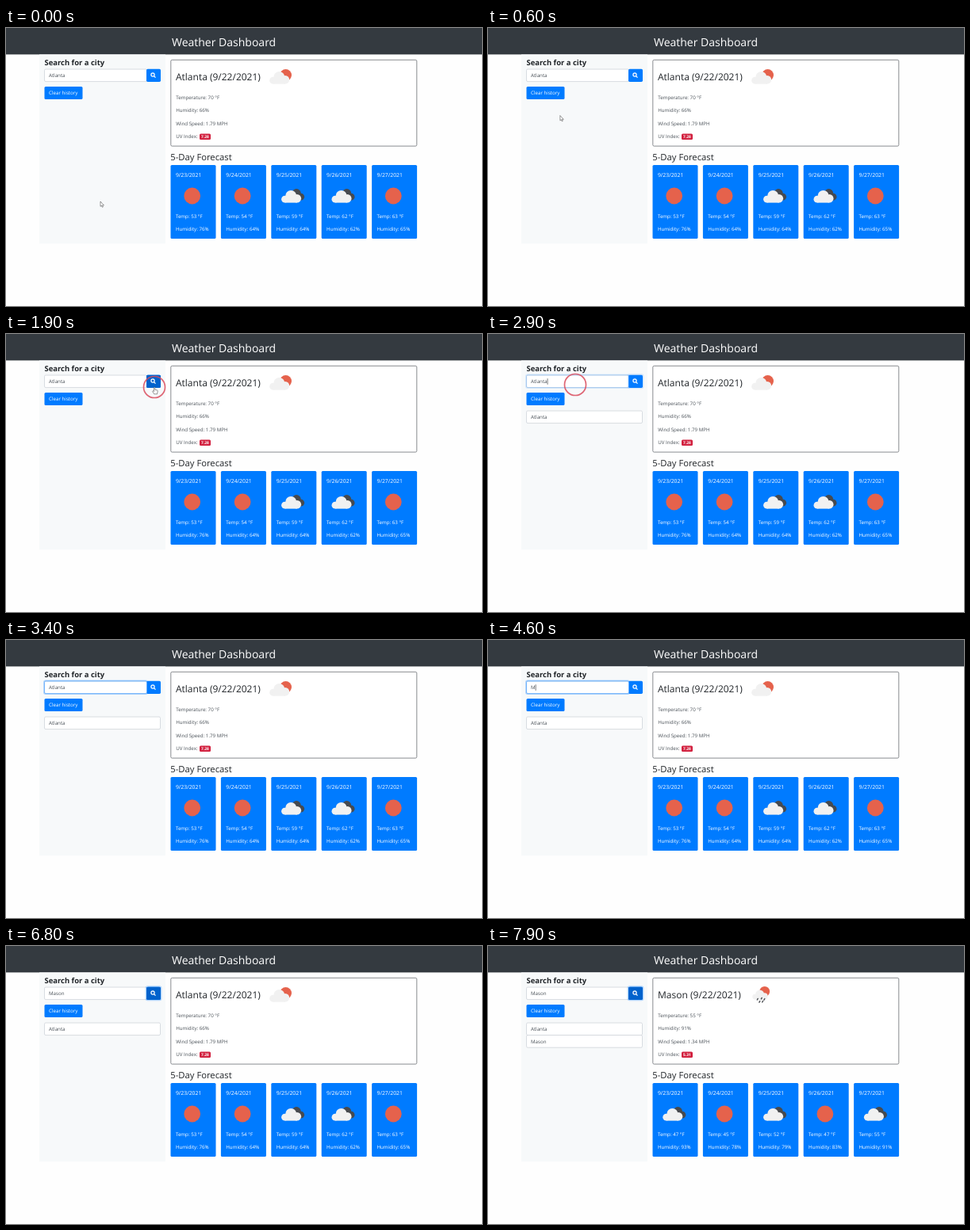
An HTML page for the animation above (8000 ms loop, 600 by 351 pixels).

```html
<!DOCTYPE html>
<html lang="en">
<head>
<meta charset="utf-8">
<title>Weather Dashboard</title>
<style>
html, body { margin: 0; width: 100%; height: 100%; overflow: hidden; background: #fefefe; }
svg { display: block; font: 6.2px "Open Sans", "Noto Sans", sans-serif; fill: #212529; text-rendering: geometricPrecision; }
.field { fill: #fff; stroke: #ced4da; stroke-width: .8; }
.gray { fill: #495057; }
.white { fill: #fff; }
.blue { fill: #007bff; }
.hover { fill: #0062cc; }
.glow { fill: none; stroke: #007bff; stroke-opacity: .28; stroke-width: 1.5; }
.sun { fill: #e5624c; }
.cloud { fill: #f1f1f1; }
.dark { fill: #474a4f; }
.arrow { fill: #fff; stroke: #333; stroke-width: .5; }
</style>
</head>
<body>
<svg id="stage" width="600" height="351" viewBox="0 0 600 351"></svg>
<script>
const LOOP = 8000;
const stage = document.getElementById('stage');
const clamp = v => Math.max(0, Math.min(1, v));
const fade = (t, from, to) => clamp((t - from) / 150) - clamp((t - to) / 150);

const text = (x, y, str, attrs = '') => `<text x="${x}" y="${y}" ${attrs}>${str}</text>`;
const rect = (x, y, w, h, attrs = '') => `<rect x="${x}" y="${y}" width="${w}" height="${h}" ${attrs}/>`;
const circle = (x, y, r, attrs = '') => `<circle cx="${x}" cy="${y}" r="${r}" ${attrs}/>`;
const group = (x, y, body, attrs = '') => `<g transform="translate(${x} ${y})" ${attrs}>${body}</g>`;

// Weather icons, drawn around their own centre
const cloud = `<g class="cloud">${circle(-10, 4.2, 4.4)}${circle(-2.3, 0, 7)}${circle(5.4, 3.3, 5.2)}${rect(-10, 2, 15.4, 6.6)}</g>`;
const drop = (x, y) => `<path d="M${x} ${y}l-.9 1.6" stroke="#474a4f" stroke-width="1.4" stroke-linecap="round"/>`;
const icons = {
  sun: circle(0, 0, 10.4, 'class="sun"'),
  clouds: `<g class="dark">${circle(4.6, -3.4, 5.6)}${circle(10.2, 1.2, 4.4)}${rect(3, 0, 7.5, 5.6)}</g>` + cloud,
  partly: circle(6, -2.5, 7.4, 'class="sun"') + cloud,
  rain: circle(4.3, -4.6, 6.4, 'class="sun"') +
    `<g transform="translate(0 -1.2) scale(.77)">${cloud}</g>` +
    drop(-4.2, 4.4) + drop(.8, 3.4) + drop(4.4, 4.6) + drop(-1.6, 7.6) + drop(2.2, 7.4)
};

function forecastCard([icon, temp, humidity], i) {
  return group(207.5 + 63.4 * i, 173,
    rect(0, 0, 57, 93, 'rx="1.6" class="blue"') +
    text(6.4, 14.6, `9/${23 + i}/2021`, 'font-size="6.85"') +
    group(27.2, 39, icons[icon]) +
    text(6.4, 66.7, `Temp: ${temp} °F`) +
    text(6.4, 83.4, `Humidity: ${humidity}%`), 'class="white"');
}

function report(id, r) {
  return `<g id="${id}">` +
    text(214, 66.3, `${r.city} (9/22/2021)`, 'font-size="12"') +
    group(r.iconX, 62, icons[r.icon]) +
    [`Temperature: ${r.temp} °F`, `Humidity: ${r.humidity}%`, `Wind Speed: ${r.wind} MPH`, 'UV Index:']
      .map((line, i) => text(214.2, 89.5 + 16.6 * i, line, 'class="gray"')).join('') +
    rect(244, 133.6, 14, 7.4, 'rx="1.5" fill="#d2213f"') +
    text(251, 139.1, r.uv, 'class="white" font-size="4.9" font-weight="700" text-anchor="middle"') +
    r.days.map(forecastCard).join('') + '</g>';
}

const historyItem = (id, y, city) => `<g id="${id}">` +
  rect(48.5, y, 146, 15.6, 'rx="1.6" class="field"') + text(54, y + 10.2, city, 'class="gray"') + '</g>';

stage.innerHTML =
  rect(0, 0, 600, 33.4, 'fill="#343a40"') +
  text(209, 23, 'Weather Dashboard', 'class="white" font-size="14" font-weight="500"') +
  rect(42, 33.4, 159, 238.8, 'fill="#f7f9fa"') +
  text(48.5, 46.8, 'Search for a city', 'font-size="9.45" font-weight="700"') +
  rect(48.5, 52, 129, 15.6, 'rx="1.6" class="field"') +
  rect(177, 51.7, 18, 16.2, 'rx="1.6" class="blue"') +
  rect(177, 51.7, 18, 16.2, 'rx="1.6" class="hover" id="searchHover"') +
  `<g fill="none" stroke="#fff" stroke-width="1.2">${circle(185, 59, 2.1)}<path d="M186.5 60.6l2 2"/></g>` +
  rect(176.4, 51.1, 19.2, 17.4, 'rx="2" class="glow" id="searchGlow"') +
  `<g id="inputGlow">${rect(48.5, 52, 129, 15.6, 'rx="1.6" fill="none" stroke="#80bdff" stroke-width=".9"')}` +
  rect(47.8, 51.3, 130.4, 17, 'rx="2" class="glow"') + '</g>' +
  text(54, 62.3, '', 'class="gray" id="query"') +
  rect(0, 56.2, .6, 7.6, 'id="caret"') +
  rect(48.5, 74, 48, 16, 'rx="1.6" class="blue"') +
  rect(48.5, 74, 48, 16, 'rx="1.6" class="hover" id="clearHover"') +
  text(54, 84.4, 'Clear history', 'class="white"') +
  historyItem('history1', 97, 'Atlanta') +
  historyItem('history2', 112.6, 'Mason') +
  rect(207.8, 40.3, 310, 108.8, 'rx="1.6" fill="#fff" stroke="#6b6f74" stroke-width=".8"') +
  text(207.3, 167.3, '5-Day Forecast', 'font-size="11.25" font-weight="500"') +
  report('before', {
    city: 'Atlanta', icon: 'partly', iconX: 346.6, temp: 70, humidity: 66, wind: 1.79, uv: '7.28',
    days: [['sun', 53, 76], ['sun', 54, 64], ['clouds', 59, 64], ['clouds', 62, 62], ['sun', 63, 65]]
  }) +
  report('after', {
    city: 'Mason', icon: 'rain', iconX: 344.4, temp: 55, humidity: 91, wind: 1.34, uv: '5.31',
    days: [['clouds', 47, 93], ['sun', 45, 78], ['clouds', 52, 79], ['sun', 47, 83], ['clouds', 55, 91]]
  }) +
  `<g id="pointer">
    <path id="arrow" class="arrow" d="M0 0V6.3L1.4 5.1 2.4 7.3 3.4 6.8 2.5 4.8H4.4Z"/>
    <path id="hand" class="arrow" d="M-.5 .6Q.2-.4 .9 .6V3.4L3.6 4Q4.3 4.3 4.2 5L3.5 8.8H-.3L-2.3 5.6Q-2.3 4.6-1.4 4.8L-.5 5.6Z"/>
    <path id="beam" d="M-1-3H1M0-3V3M-1 3H1" fill="none" stroke="#777" stroke-width=".5"/>
  </g>` +
  circle(0, 0, 0, 'id="ring" fill="none" stroke="#d94a5b" stroke-width="1.7"');

const part = Object.fromEntries([...stage.querySelectorAll('[id]')].map(el => [el.id, el]));
const show = (id, on) => part[id].setAttribute('visibility', on ? 'visible' : 'hidden');
const opacity = (id, v) => part[id].setAttribute('opacity', v);

// Pointer stops: time, x, y
const path = [
  [0, 119, 219], [100, 119, 219], [800, 84, 84], [1050, 92, 83],
  [1200, 130.5, 79], [1750, 187, 67], [2050, 187, 67], [2750, 110, 64], [LOOP, 110, 64]
];
const clicks = [[1800, 187, 67], [2800, 110, 64]];

function pointerAt(t) {
  const i = path.findIndex(stop => stop[0] > t);
  const [t0, x0, y0] = path[i - 1], [t1, x1, y1] = path[i];
  const p = (t - t0) / (t1 - t0), e = p * p * (3 - 2 * p);
  return [x0 + (x1 - x0) * e, y0 + (y1 - y0) * e];
}

function queryAt(t) {
  if (t < 4500) return 'Atlanta'.slice(0, 7 - Math.max(0, Math.min(7, Math.floor((t - 3700) / 100))));
  return 'Mason'.slice(0, Math.max(0, Math.floor((t - 4400) / 200)));
}

function drawPointer(t) {
  const [x, y] = pointerAt(t);
  const inside = (l, top, r, b) => x >= l && x <= r && y >= top && y <= b;
  const hand = inside(177, 52, 195, 68) || inside(48.5, 74, 96.5, 90);
  const beam = inside(48.5, 52, 177, 68);
  const visible = t < 2800;
  part.pointer.setAttribute('transform', `translate(${x} ${y})`);
  show('hand', visible && hand);
  show('beam', visible && beam);
  show('arrow', visible && !hand && !beam);
}

function drawRing(t) {
  const click = clicks.find(c => t >= c[0] && t < c[0] + 500);
  show('ring', click);
  if (!click) return;
  const age = (t - click[0]) / 1000;
  part.ring.setAttribute('cx', click[1]);
  part.ring.setAttribute('cy', click[2]);
  part.ring.setAttribute('r', 12 + 15 * age);
  opacity('ring', .85 * clamp((.5 - age) / .4));
}

function draw(t) {
  part.query.textContent = queryAt(t);
  const caretX = 54.2 + part.query.getComputedTextLength();
  part.caret.setAttribute('x', caretX);
  show('caret', (t >= 2850 && t < 3400) || (t >= 3800 && t < 5850));
  opacity('inputGlow', fade(t, 2830, 6400));
  opacity('searchGlow', fade(t, 1900, 2830) + fade(t, 6400, LOOP));
  opacity('searchHover', fade(t, 1650, 2200) + fade(t, 6400, LOOP));
  opacity('clearHover', fade(t, 650, 1150));
  show('history1', t >= 2800);
  show('history2', t >= 7000);
  show('before', t < 7000);
  show('after', t >= 7000);
  drawPointer(t);
  drawRing(t);
}

function tick() {
  draw(performance.now() % LOOP);
  requestAnimationFrame(tick);
}
tick();
</script>
</body>
</html>
```
